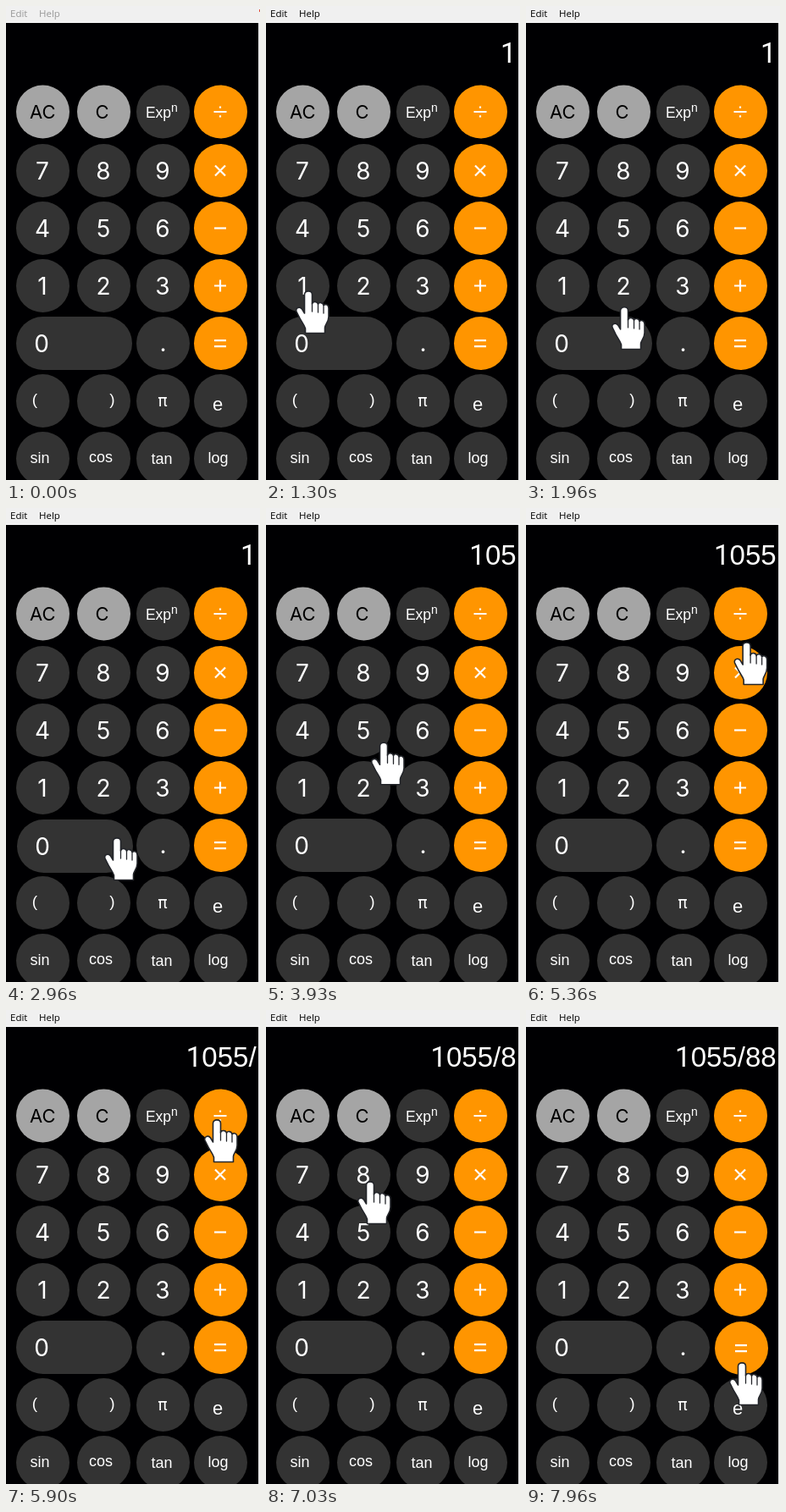
Animation of 300 by 560 pixels, one loop 8000 ms. Source, as an HTML page:

```html
<!DOCTYPE html>
<html lang="en">
<head>
<meta charset="utf-8">
<title>Calculator</title>
<style>
  html, body { margin: 0; width: 100%; height: 100%; overflow: hidden; background: #000; }
  svg { display: block; width: 300px; height: 560px; }
  text { white-space: pre; }
  .ui { font: 11.5px "Open Sans", "Noto Sans", sans-serif; }
  .digit { font-family: Inter, Roboto, sans-serif; }
  .label { font-family: "Liberation Sans", Arial, sans-serif; }
  .symbol { font-family: "DejaVu Sans", sans-serif; }
  .display { font: 33px "Liberation Sans", Arial, sans-serif; fill: #fff; }
  .display .one { font-family: Roboto, sans-serif; }
</style>
</head>
<body>
<svg id="stage" viewBox="0 0 300 560">
  <rect width="300" height="560" fill="#000002"/>
  <rect x="298" y="19" width="2" height="541" fill="#e6e6e6"/>
  <rect width="300" height="19" fill="#f0f0f0"/>
  <rect y="19" width="300" height="1" fill="#fafafa"/>
  <g id="menu" class="ui"><text x="5" y="13">Edit</text><text x="39" y="13">Help</text></g>
  <rect id="edge" x="299" y="4" width="1" height="3" fill="#e05040"/>
  <text id="display" class="display" x="295.6" y="67" text-anchor="end"></text>
  <g id="keys"></g>
  <g id="cursor" stroke="#24262b" stroke-width="1.6" stroke-linejoin="round" stroke-linecap="round">
    <path fill="#fff" d="M-4.5 4C-4.5-1.5 4.5-1.5 4.5 4V15C5 11.5 11 11.5 11.5 15.5
      C12.5 12.5 17.5 13 18 17C19.5 14.5 24 15.5 24 20V30C24 36 20 39 19.5 43V49.5H-3.5V44
      C-5 39-9 35-11 30L-14 24C-15.5 19.5-10 17.5-7.5 21L-4.5 26Z"/>
    <path fill="none" d="M4.5 14V24M11.5 16V25M18 18V26" stroke-width="1.3"/>
  </g>
</svg>
<script>
const LOOP = 8000;
const PRESS = 70;
const COLS = [43.5, 115.5, 185.5, 253.5];
const ROWS = [125, 194.5, 262.5, 330.5, 398.5, 466.5, 534.5];
const DARK = '#333', LIGHT = '#a5a5a5', ORANGE = '#ff9500';
const $ = id => document.getElementById(id);

function add(parent, tag, attrs, content = '') {
  const node = document.createElementNS('http://www.w3.org/2000/svg', tag);
  for (const name in attrs) node.setAttribute(name, attrs[name]);
  node.textContent = content;
  return parent.appendChild(node);
}

const keys = {};

function addKey(name, col, row, fill = DARK, width = 63) {
  const g = keys[name] = add($('keys'), 'g', {});
  add(g, 'rect', { x: COLS[col] - 31.5, y: ROWS[row] - 31.5, width, height: 63, rx: 31.5, fill });
  return g;
}

function write(g, content, x, y, size, family = 'label', fill = '#fff') {
  add(g, 'text', { x, y, class: family, 'font-size': size, fill, 'text-anchor': 'middle' }, content);
}

// Grey keys
write(addKey('AC', 0, 0, LIGHT), 'AC', 43.3, 133, 22, 'digit', '#000');
write(addKey('C', 1, 0, LIGHT), 'C', 113.5, 133, 22, 'digit', '#000');

// Digits
['789', '456', '123'].forEach((line, r) => [...line].forEach((d, c) =>
  write(addKey(d, c, r + 1), d, COLS[c] - .5, ROWS[r + 1] + 10, 28, 'digit')));
write(addKey('0', 0, 4, DARK, 137), '0', 42, 408.5, 28, 'digit');
write(addKey('.', 2, 4), '.', 185.5, 408, 28, 'digit');

// Functions
const exp = addKey('exp', 2, 0);
write(exp, 'Exp', 180, 132, 17.5);
write(exp, 'n', 199, 124.5, 14);
write(addKey('(', 0, 5), '(', 34, 471, 19);
write(addKey(')', 1, 5), ')', 125.5, 471, 19);
write(addKey('pi', 2, 5), 'π', 185, 473, 19, 'symbol');
write(addKey('e', 3, 5), 'e', 250, 478, 22);
write(addKey('sin', 0, 6), 'sin', 40, 540, 18);
write(addKey('cos', 1, 6), 'cos', 112, 539, 18);
write(addKey('tan', 2, 6), 'tan', 184, 541, 18);
write(addKey('log', 3, 6), 'log', 250.5, 540, 18);

// Operators
const OPERATORS = {
  '/': 'M-7.5 0H7.5M0-6.6V-4.2M0 4.2V6.6',
  '*': 'M-6-6L6 6M6-6L-6 6',
  '-': 'M-7 0H7',
  '+': 'M-7 0H7M0-7V7',
  '=': 'M-7-3.3H7M-7 3.7H7'
};
Object.entries(OPERATORS).forEach(([name, d], row) =>
  add(addKey(name, 3, row, ORANGE), 'path', {
    d, transform: `translate(253 ${ROWS[row]})`, stroke: '#fff', 'stroke-width': 2.2, fill: 'none'
  }));

// Each press: start time and key
const presses = [
  [1230, '1'], [2960, '0'], [3800, '5'], [4230, '5'],
  [5830, '/'], [6960, '8'], [7300, '8'], [7930, '=']
];

// Fingertip path: time, x, y
const path = [
  [430, -30, 322], [460, -24, 325], [700, 22, 337], [930, 50, 338], [1230, 50, 337],
  [1330, 50, 337], [1700, 86, 348], [2100, 129, 363], [2330, 131, 390], [3030, 131, 390],
  [3330, 137, 330], [3630, 139, 278], [3900, 139, 278], [4130, 139, 263], [4630, 139, 263],
  [4900, 246, 252], [5160, 268, 205], [5430, 257, 146], [5630, 249, 130], [6000, 249, 130],
  [6230, 201, 270], [6300, 200, 271], [6500, 150, 234], [6700, 123, 203], [7370, 123, 203],
  [7580, 196, 315], [7760, 255, 417], [8000, 255, 417]
];

// Slope at a point; zero where the hand rests
function slope(i, axis) {
  const a = path[i - 1], b = path[i], c = path[i + 1];
  if (!a || !c) return 0;
  const still = (p, q) => p[1] === q[1] && p[2] === q[2];
  return still(a, b) || still(b, c) ? 0 : (c[axis] - a[axis]) / (c[0] - a[0]);
}

function position(t, axis) {
  const i = Math.max(0, path.findIndex(p => p[0] > t) - 1);
  const a = path[i], b = path[i + 1], span = b[0] - a[0];
  const u = Math.min(1, Math.max(0, (t - a[0]) / span));
  const s = u * u * (3 - 2 * u);
  return a[axis] + (b[axis] - a[axis]) * s
    + span * u * (1 - u) * ((1 - u) * slope(i, axis) - u * slope(i + 1, axis));
}

let shown = null;
function show(value) {
  if (value === shown) return;
  shown = value;
  $('display').textContent = '';
  for (const ch of value) add($('display'), 'tspan', ch === '1' ? { class: 'one' } : {}, ch);
}

function draw(now) {
  const t = now % LOOP;
  const down = presses.find(([at]) => t >= at && t < at + PRESS);
  for (const name in keys)
    keys[name].setAttribute('transform', down && down[1] === name ? 'translate(1 1)' : '');
  show(presses.filter(([at]) => t >= at + PRESS).map(p => p[1]).join(''));

  const active = t >= presses[0][0];
  $('menu').setAttribute('fill', active ? '#000' : '#999');
  $('edge').style.display = active ? 'none' : '';

  $('cursor').style.display = t < 460 ? 'none' : '';
  $('cursor').setAttribute('transform', `translate(${position(t, 1)} ${position(t, 2)})`);
}

const start = performance.now();
function tick() {
  draw(performance.now() - start);
  requestAnimationFrame(tick);
}
tick();
</script>
</body>
</html>
```
